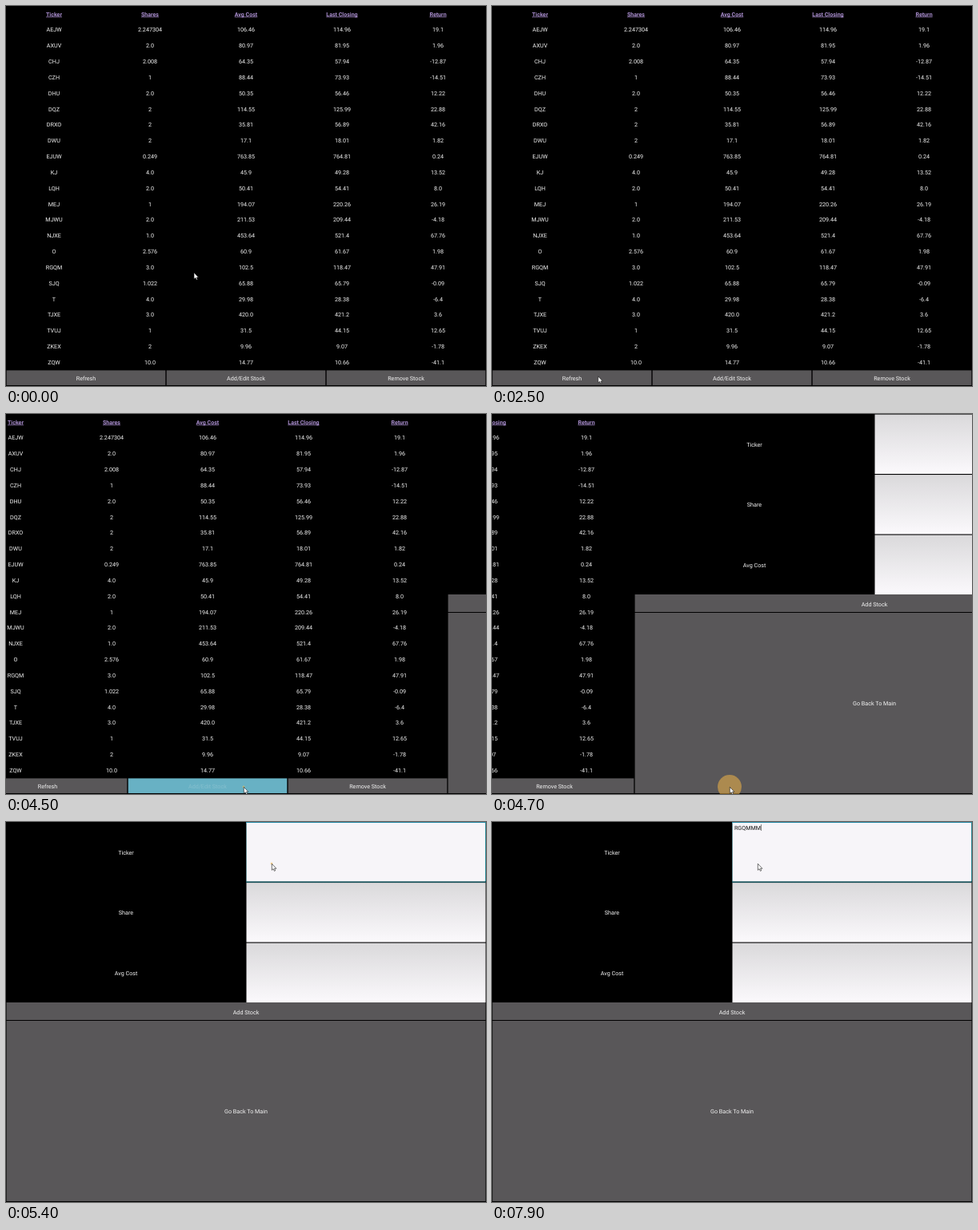
Recreate the animation shown at these times as an HTML page. Size 600x476 px, loop 8 s.

```html
<!DOCTYPE html>
<html lang="en">
<head>
<meta charset="utf-8">
<title>Portfolio</title>
<style>
html, body { margin: 0; width: 100%; height: 100%; overflow: hidden; background: #000; }
svg { display: block; width: 600px; height: 476px; }
text { font: 7.2px Roboto, sans-serif; fill: #f4f4f4; text-anchor: middle; text-rendering: geometricPrecision; white-space: pre; }
.head { font-size: 7.05px; font-weight: 700; fill: #ab8fd0; text-decoration: underline; text-decoration-skip-ink: none; }
#typed { fill: #111; text-anchor: start; }
</style>
</head>
<body>
<svg viewBox="0 0 600 476">
  <defs>
    <linearGradient id="shade" x2="0" y2="1">
      <stop stop-color="#dad9db"/><stop offset="1" stop-color="#fbf9fc"/>
    </linearGradient>
  </defs>
  <g id="list"></g>
  <g id="form"></g>
  <circle id="ripple" fill="#ffbe46"/>
  <path id="mouse" d="M0 0V8L1.8 6.4 3.1 9.1 4.4 8.5 3.2 6H5.6Z" fill="#fff" stroke="#111" stroke-width=".6"/>
</svg>
<script>
const $ = id => document.getElementById(id);
const list = $('list'), form = $('form'), ripple = $('ripple'), mouse = $('mouse');

function add(parent, tag, attrs, content = '') {
  const el = document.createElementNS('http://www.w3.org/2000/svg', tag);
  for (const k in attrs) el.setAttribute(k, attrs[k]);
  el.textContent = content;
  parent.append(el);
  return el;
}
const label = (parent, s, x, y, cls = '') =>
  add(parent, 'text', { x, y: y + 2.6, class: cls }, s);
const rect = (parent, x, y, width, height, fill) =>
  add(parent, 'rect', { x, y, width, height, fill });
function button(parent, s, x, y, w, h, textY) {
  return [rect(parent, x, y, w, h, '#595759'), label(parent, s, x + w / 2, textY)];
}

// Stock table
const rows = `Ticker,Shares,Avg Cost,Last Closing,Return
AEJW,2.247304,106.46,114.96,19.1
AXUV,2.0,80.97,81.95,1.96
CHJ,2.008,64.35,57.94,-12.87
CZH,1,88.44,73.93,-14.51
DHU,2.0,50.35,56.46,12.22
DQZ,2,114.55,125.99,22.88
DRXO,2,35.81,56.89,42.16
DWU,2,17.1,18.01,1.82
EJUW,0.249,763.85,764.81,0.24
KJ,4.0,45.9,49.28,13.52
LQH,2.0,50.41,54.41,8.0
MEJ,1,194.07,220.26,26.19
MJWU,2.0,211.53,209.44,-4.18
NJXE,1.0,453.64,521.4,67.76
O,2.576,60.9,61.67,1.98
RGQM,3.0,102.5,118.47,47.91
SJQ,1.022,65.88,65.79,-0.09
T,4.0,29.98,28.38,-6.4
TJXE,3.0,420.0,421.2,3.6
TVUJ,1,31.5,44.15,12.65
ZKEX,2,9.96,9.07,-1.78
ZQW,10.0,14.77,10.66,-41.1`.split('\n');
const rowH = 476 / 24;
rows.forEach((row, i) => row.split(',').forEach((s, j) =>
  label(list, s, 60 + 120 * j, rowH * (i + .5), i ? '' : 'head')));
const [, editButton] = ['Refresh', 'Add/Edit Stock', 'Remove Stock'].map((s, i) =>
  button(list, s, 200 * i + .7, 456.4, 198.6, 18.6, 466));

// Entry form
const fields = ['Ticker', 'Share', 'Avg Cost'].map((s, i) => {
  const y = 75.5 * i;
  label(form, s, 150, y + 37.9);
  return rect(form, 300.5, y + .6, 299, 74.4, 'url(#shade)');
});
const focus = add(form, 'g', {});
rect(focus, 300, 0, 300, 76, '#0f4d55');
rect(focus, 300, 0, 300, 2, '#2387a3');
rect(focus, 599, 0, 1, 74, '#2c8c98');
rect(focus, 300.6, 1, 298.4, 73.4, '#f7f5f9');
const typed = add(focus, 'text', { id: 'typed', x: 302.9, y: 9.6 });
const caret = rect(focus, 303, 3, .7, 8, '#555');
button(form, 'Add Stock', .6, 226, 598.8, 22, 237.9);
button(form, 'Go Back To Main', .6, 249, 598.8, 226, 362.4);

// Pointer stops: time, x, y
const path = [
  [500, 235, 334], [1200, 38, 326], [1400, 66, 334], [2300, 110, 462],
  [3200, 290, 477], [3300, 300, 480], [4000, 297.3, 467.3],
  [4900, 297.3, 467.3], [5300, 332.3, 52.3]
];
const clicks = [[4480, 297, 467], [5380, 332, 52]];
const keys = [5800, 6300, 6800, 7200, 7500, 7800];
const clamp = v => Math.max(0, Math.min(1, v));

function pointer(t) {
  const i = path.findIndex(p => p[0] > t);
  if (i == 0) return path[0].slice(1);
  if (i < 0) return path.at(-1).slice(1);
  const [t0, x0, y0] = path[i - 1], [t1, x1, y1] = path[i];
  const k = (t - t0) / (t1 - t0), e = k * k * (3 - 2 * k);
  return [x0 + (x1 - x0) * e, y0 + (y1 - y0) * e];
}

function draw(t) {
  const k = clamp((t - 4480.4) / 482), shift = Math.round(600 * k * (2 - k));
  list.setAttribute('transform', `translate(${-shift})`);
  form.setAttribute('transform', `translate(${600 - shift})`);

  const pressed = t >= 4480;
  editButton[0].setAttribute('fill', pressed ? '#68b1c4' : '#595759');
  editButton[1].setAttribute('opacity', pressed ? .2 : 1);

  const focused = t >= 5400;
  focus.style.display = focused ? '' : 'none';
  fields[0].style.display = focused ? 'none' : '';
  const n = keys.filter(at => t >= at).length;
  typed.textContent = 'RGQMMM'.slice(0, n);
  caret.setAttribute('x', 303 + (n ? typed.getComputedTextLength() : 0));
  caret.style.display = t >= 5500 ? '' : 'none';

  const click = clicks.find(c => t >= c[0] && t < c[0] + 400);
  ripple.style.display = click ? '' : 'none';
  if (click) {
    const age = t - click[0];
    ripple.setAttribute('cx', click[1]);
    ripple.setAttribute('cy', click[2]);
    ripple.setAttribute('r', 15 * clamp(age / 200));
    ripple.setAttribute('opacity', .5 * clamp((400 - age) / 180));
  }
  mouse.setAttribute('transform', `translate(${pointer(t)})`);
}

const start = performance.now();
function tick() {
  draw(Math.floor((performance.now() - start) % 8000 / 100) * 100);
  requestAnimationFrame(tick);
}
tick();
</script>
</body>
</html>
```
